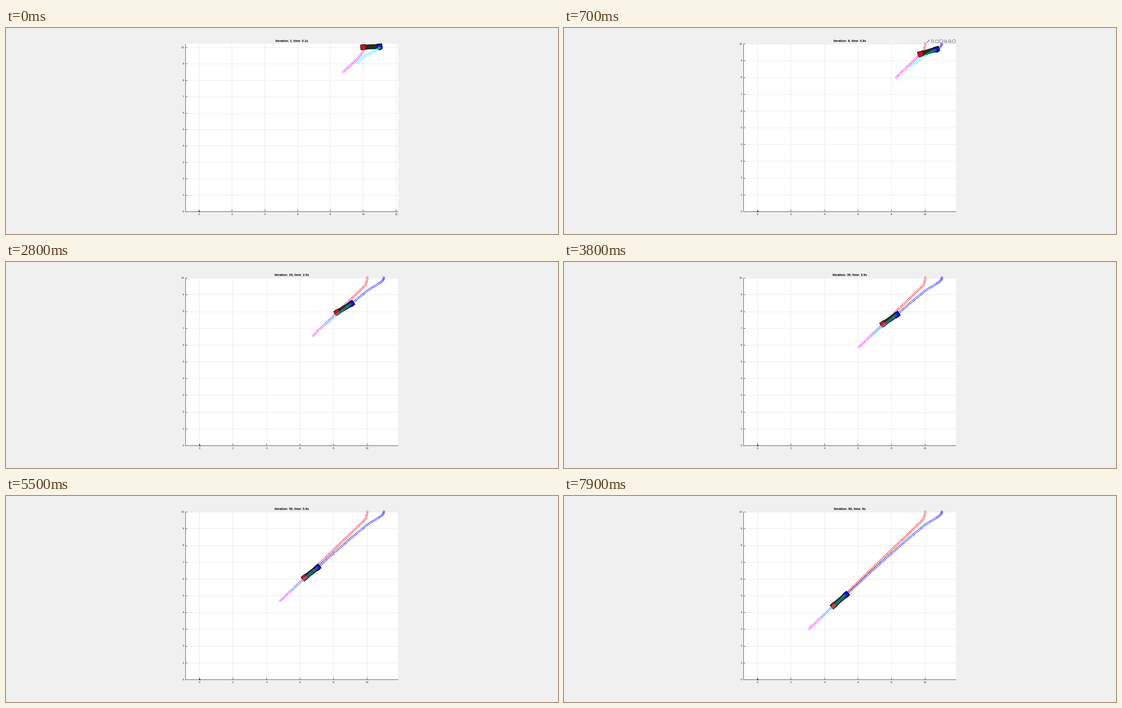
Write a matplotlib script that moves like this. It is 1225 px wide and 457 px high and loops after 8000 ms.

```python
import numpy as np
import matplotlib.pyplot as plt
from matplotlib.animation import FuncAnimation
from matplotlib.collections import LineCollection
from matplotlib.patches import Circle, Polygon, Rectangle
from matplotlib.transforms import Affine2D

W, H = 1225, 457
LEFT, RIGHT, TOP, BASE = 398, 870, 34.7, 406.5
STEPS, HORIZON, STEP = 80, 20, 0.1
INK, GRID, ICON = "#262626", "#dfdfdf", "#707070"
PT = 0.72  # points per pixel at 100 dpi

plt.rcParams["font.family"] = "Liberation Sans"
fig = plt.figure(figsize=(W / 100, H / 100), dpi=100, facecolor="#f0f0f0")
ax = fig.add_axes([0, 0, 1, 1])
ax.set_xlim(0, W)
ax.set_ylim(H, 0)
ax.axis("off")
ax.add_patch(Rectangle((LEFT, TOP), RIGHT - LEFT, BASE - TOP, fc="white", lw=0))

# Half a pixel back, so that snapped lines fall in the pixel that holds them.
CRISP = ax.transData + Affine2D().translate(-0.5, -0.5)


def unit(angle):
    return np.stack([np.cos(angle), np.sin(angle)], axis=-1)


def follow(angle, start, count, rate):
    """Tilts of the rod as it swings towards the heading."""
    out = [angle]
    for j in range(start, start + count):
        out.append(out[-1] + rate * STEP * np.sin(heading[j] - out[-1]))
    return np.array(out)


# The front turns left from straight down, then runs straight at constant speed.
n = np.arange(STEPS + HORIZON)
heading = np.radians(np.maximum(43.84, 90 - 8 * n))
front = np.array([10, 10]) - STEP * np.vstack(
    [[0, 0], np.cumsum(unit(heading), axis=0)])

# The rod swings fast while turning and settles slowly afterwards.
TURN = 18
swing = follow(0, 0, TURN, 0.48)
tilt = np.append(swing[:-1], follow(swing[-1], TURN, len(n) - TURN, 0.27))
rear = front + unit(tilt)


def view(k):
    """Scale and x origin in pixels for the equal-axis limits."""
    high = 10 + max(0, 0.215 - 0.066 * k)
    wide = 11.28 - 0.02 * k if k < 4 else 11
    scale = (BASE - TOP) / high
    return scale, (LEFT + RIGHT) / 2 - wide / 2 * scale


def segments(color, width, z, lines=(), transform=ax.transData):
    return ax.add_collection(LineCollection(
        list(lines), colors=color, linewidths=width * PT, zorder=z,
        transform=transform))


def rings(color, z):
    return segments(color, 0.6, z)


def ngon(sides, radius, turn=-np.pi / 2):
    return radius * unit(turn + np.linspace(0, 2 * np.pi, sides + 1))


def disc(face, edge):
    return ax.add_patch(Circle((0, 0), 6.3, fc=face, ec=edge, lw=0.8 * PT, zorder=7))


def shape(face, z):
    return ax.add_patch(Polygon(np.zeros((4, 2)), fc=face, ec="black",
                                lw=0.8 * PT, zorder=z))


def label(ha):
    return ax.text(0, 0, "", fontsize=6.3 * PT, color=INK, ha=ha, va="center",
                   zorder=2)


grid = segments(GRID, 0.7, 1, transform=CRISP)
ticks = segments(INK, 0.8, 2, transform=CRISP)
corner = (LEFT, BASE)
segments(INK, 0.8, 2, [[(LEFT, TOP), corner], [corner, (RIGHT, BASE)]], CRISP)
x_labels = [label("center") for _ in range(7)]
y_labels = [label("right") for _ in range(11)]
title = ax.text(634, 31.3, "", fontsize=7.05 * PT, weight="bold", color="black",
                ha="center", va="baseline")
star = segments("black", 0.5, 3)

front_trail, rear_trail = rings("#ff0000", 3), rings("#0000ff", 3)
body = shape("#383838", 4)
ribs = segments("black", 0.6, 5)
ends = [shape("#1c1c1c", 5) for _ in range(2)]
ahead = rings("#ff00ff", 6)
discs = [disc("#bd161e", "#4c080c"), disc("#1414b4", "#08084c")]
centers = [rings("#e01818", 8), rings("#1a2cff", 8)]
rear_ahead = rings("#00ffff", 9)


def make_toolbar():
    """Seven small outlines: pencil, brush, note, hand, two lenses, house."""
    lines = []
    for i, sides in enumerate((2, 3, 4, 7, 20, 20, 5)):
        at = np.array([808.3 + 9.5 * i, 29.2])
        turn = -np.pi / 4 if sides in (2, 4) else -np.pi / 2
        lens = sides == 20
        lines.append(at + ngon(sides, 3 if lens else 4, turn))
        if lens:
            lines += [[at + 2.1, at + 4], [at - (1.5, 0), at + (1.5, 0)]]
            if i == 4:
                lines.append([at - (0, 1.5), at + (0, 1.5)])
    return segments(ICON, 0.8, 4, lines)


toolbar = make_toolbar()


def draw_axes(scale, x0):
    lines, marks = [], []
    for i, text in enumerate(x_labels):
        x = x0 + 2 * i * scale
        text.set_visible(x <= RIGHT)
        if x <= RIGHT:
            text.set_text(str(2 * i))
            text.set_position((x, 413.6))
            lines.append([(x, TOP), (x, BASE)])
            marks.append([(x, BASE), (x, BASE - 4.7)])
    for i, text in enumerate(y_labels):
        y = BASE - i * scale
        text.set_text(str(i))
        text.set_position((395.2, y + 0.8))
        lines.append([(LEFT, y), (RIGHT, y)])
        marks.append([(LEFT, y), (LEFT + 4.7, y)])
    grid.set_segments(lines)
    ticks.set_segments(marks)
    spokes = 2 * unit(np.arange(4) * np.pi / 4)
    origin = np.array([x0, BASE])
    star.set_segments([[origin - s, origin + s] for s in spokes])


def draw(k):
    scale, x0 = view(k)

    def px(p):
        return np.asarray(p) * [scale, -scale] + [x0, BASE]

    def put(artist, points):
        spots = np.floor(px(points)) + 0.5
        artist.set_segments(list(spots[:, None] + ngon(16, 2)))

    draw_axes(scale, x0)
    title.set_text(f"Iteration: {k + 1}, time: {(k + 1) / 10:g}s")
    last = k + HORIZON + 1
    put(front_trail, front[:k + 1])
    put(rear_trail, rear[:k + 1])
    put(ahead, front[k + 1:last])
    forecast = follow(tilt[k], k, HORIZON, 0.75)[1:]
    put(rear_ahead, front[k + 1:last] + unit(forecast))

    along = unit(tilt[k + 1])
    across = np.array([-along[1], along[0]])

    def spot(u, v):
        return px(front[k] + u * along + v * across)

    def box(a, b, half):
        return [spot(a, -half), spot(b, -half), spot(b, half), spot(a, half)]

    body.set_xy(box(-0.1, 1.1, 0.137))
    for at, end in enumerate(ends):
        end.set_xy(box(at - 0.155, at + 0.155, 0.155))
    ribs.set_segments([[spot(u, -0.14), spot(u, 0.14)]
                       for u in np.linspace(0.15, 0.85, 12)])
    for path, dot, center in zip((front, rear), discs, centers):
        dot.center = px(path[k])
        put(center, path[k:k + 1])
    toolbar.set_visible(4 <= k <= 13)
    return []


anim = FuncAnimation(fig, draw, frames=STEPS, interval=100, repeat=True,
                     init_func=lambda: draw(0), cache_frame_data=False)
plt.show()
```
